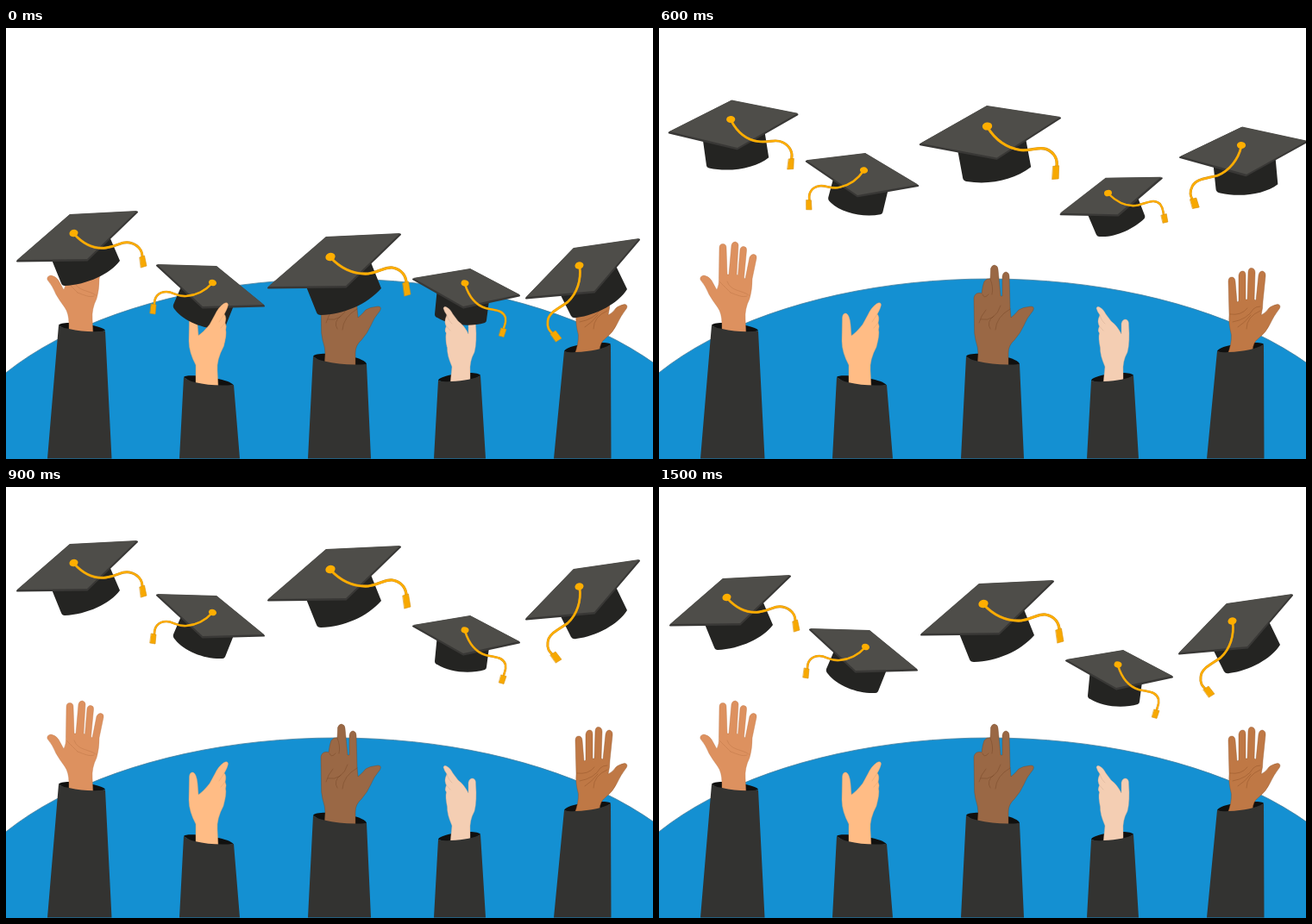
An HTML page with a canvas that plays this animation: 750 px wide and 500 px high, repeating every 1.8 s.

```html
<!DOCTYPE html>
<html lang="en">
<head>
<meta charset="utf-8">
<title>Cap toss</title>
<style>
html, body { margin: 0; width: 100%; height: 100%; overflow: hidden; background: #fff; }
canvas { display: block; width: 750px; height: 500px; }
</style>
</head>
<body>
<canvas id="stage" width="750" height="500"></canvas>
<script>
const ctx = document.getElementById('stage').getContext('2d');
const STEP = 300;

// Each step: caps held in hand, or lifted by some height, upright or tilted
const beats = [
  { held: true }, { lift: 0 }, { lift: 0, tilt: true },
  { lift: 40 }, { lift: 0, tilt: true }, { lift: 0 }
];

const arms = [
  {
    skin: '#dd915f', line: '#bd7446',
    back: 'M61 345C62 338 113 344 115 351L101 356L73 353Z',
    sleeve: 'M61 345Q66 348 73 349Q95 354 115 351.500L122.500 499.400H48Z',
    hand: 'M73 355L73 343Q73 331 68 324Q62 316 58 309Q54 299 48 292Q47 288 52 287Q58 288 61 293L67 304Q70 298 69.5 290L70 255Q70 250.5 74 250.5Q78 250.5 78 255L79 286L81 286L84 252Q85 248 88.5 248Q92 249 92 252L90 286L91.5 287L94 257Q95 253 98.5 253.5Q102 254 101.5 258L98.5 290L100 291L105 266Q107 262 110 262.5Q113.500 263 113 267L108 291Q108 304 105 314Q99 326 100 338L101 357Z',
    crease: 'M70 294C77 301 79 303 83 307M79 294C83 306 97 304 104 310M83 307C91 310 97 313 102 311'
  },
  {
    skin: '#ffbc85', line: '#dfa16e',
    back: 'M206 405C208 400 258 406 263.500 414L246 418L219 414Z',
    sleeve: 'M206 405Q211 409 219 411Q240 416 264 414L271 499.400H201Z',
    hand: 'M220 417V391Q212 376 212 363L212.500 336Q213 330.500 217 331Q221 333 222 344L223 357Q229 353 236 344L242 333Q246 324 252 320Q257 317 257.500 321Q257 325 253 332Q256 335 254 342Q256 346 254.500 350Q256 355 252 370Q244 385 245 397L246 418Z',
    crease: 'M253 332L247 341M254 342L249 348',
    front: [223, 40]
  },
  {
    skin: '#9a6845', line: '#744728',
    back: 'M356 381C358 374 415 379 418 390L405 394L369 390Z',
    sleeve: 'M356 381Q361 385 369 386.500Q392 392 418 390L423 499.400H350Z',
    hand: 'M369 392L370 378Q370 371 367 362Q365 354 365.500 345L365 313Q366 308 370 307.500Q373 307 374 308Q375 299 377 294Q380 290 384 291L384.500 279Q386 275 389 275Q393 276 393 280L396 311L398 311L398 288Q399 283 402.500 283Q406 284 406 288L407 325L408 336Q413 332 417 327Q421 324 431 323Q436 323 433.500 328Q426 337 423 345Q419 354 412 362Q405 368 405 377V394Z',
    crease: 'M384 291Q388 301 386 309M375 309Q377 315 382 309M373 338Q390 341 396 322M379 327Q373 334 371 342M390 350Q391 335 407 326M384 349Q379 341 388 334'
  },
  {
    skin: '#f4ceb3', line: '#cfab93',
    back: 'M501 409C501 402 547 396 550 403L538 411L515 413Z',
    sleeve: 'M501 409Q507 411 515 410Q540 409 550 403L556 499.400H496Z',
    hand: 'M515 413L517 393Q511 379 511.500 371Q509 359 510.500 354Q508 351 510.500 346Q508 341 509.500 337L511 333Q508 329 507 325Q508 322 511 324Q515 326 518 332L524 340Q531 345 536 355L536 343Q537 338 541 338Q545 339 544.500 345Q546 364 543 376Q537 387 538 399V412Z',
    crease: 'M511 333Q513 340 517 343M510.500 346L515 351',
    front: [495, 40]
  },
  {
    skin: '#bf7845', line: '#8f5126',
    back: 'M647 375C649 367 698 362 701 367L688 377L659 380Z',
    sleeve: 'M647 375Q653 377 660 376Q688 375 701 367L701.500 499.400H635Z',
    hand: 'M659 379Q664 366 663.500 356Q660 343 661 333L660 294Q660 289 664 289Q667.500 289 668 294L670 318L672 317L672 287Q673 282 676.500 282Q680 282 680 287V315H682L683 283Q683.500 278 687 278.500Q691 279 691 284L690 315L692 316L695 287Q696 282 699.500 282Q703.500 283 703 288L700 317Q700 325 698 333Q703 331 707 325Q710 322 717 320.500Q721 321 719.500 325Q712 335 708 344Q704 353 695 360Q688 365 688 375Z',
    crease: 'M662 332Q675 334 682 325M665 341Q682 338 689 326Q692 323 697 323M681 349Q681 335 697 328M671 347Q679 342 686 333'
  }
];

// Board corners run left, top, right, bottom; pin is the button; drop is the way down to the hand
const caps = [
  {
    board: [13, 159, 74, 106, 152, 102, 94, 158], pin: [78.5, 128], moved: [83.2, 106], turn: 14.2, size: 1, drop: 110,
    body: 'M53 159L64 186Q65 189 68 189C94 188 121 175 132 160L120 132Z',
    cord: 'M79 129C88 139 100 147 116 145C130 143 134 137 143 139C153 141 158 148 158 155',
    knot: 'M155 156L160.500 154L163 166L156.500 168Z'
  },
  {
    board: [175, 164, 244, 166, 299, 211, 228, 213], pin: [239.5, 185.5], moved: [237.5, 165], turn: -8.4, size: .9, drop: 110,
    body: 'M203 190L194 211Q193 214 196 217C207 231 231 240 251 239Q253 239 254 237L264 212Z',
    cord: 'M239 186C231 195 221 200 209 201C198 202 194 196 186 196C176 196 172 203 172 210',
    knot: 'M168.500 210L174 211L173 222L167 221Z'
  },
  {
    board: [304, 170, 371, 112, 457, 108, 394, 169], pin: [376, 135.5], moved: [380.5, 114], turn: 11.3, size: 1.12, drop: 130,
    body: 'M348 170L360 200Q361 203 365 203C392 202 418 191 435 172L423 142Z',
    cord: 'M376 136C388 149 402 156 420 155C434 153 438 147 448 148C459 150 464 158 464 166',
    knot: 'M460 166L466.500 164L469 179L462 181Z'
  },
  {
    board: [472, 200, 538, 189, 595, 219, 530, 233], pin: [532, 206], moved: [520.5, 191.5], turn: -28.5, size: .88, drop: 90,
    body: 'M500 211L497 242Q497 245 500 246C514 255 538 257 555 252Q557 251 557 249L560 226Z',
    cord: 'M532 207C536 220 543 231 556 235C568 238 576 237 579 246C580 252 578 255 577 258',
    knot: 'M574 258L580 259.500L577 268.500L571.500 267Z'
  },
  {
    board: [603, 192, 658, 135, 734, 124, 682, 185], pin: [664.5, 155.5], moved: [675, 136], turn: 20.5, size: 1, drop: 120,
    body: 'M643 190L655 214Q657 217 661 216C685 213 710 199 720 183L707 156Z',
    cord: 'M665 157C667 172 662 188 651 198C640 206 629 210 628 220C627 228 630 231 633 234',
    knot: 'M631 235L637 231L644 240L637.500 244Z'
  }
];

for (const item of [...arms, ...caps])
  for (const key in item)
    if (typeof item[key] === 'string' && item[key][0] === 'M') item[key] = new Path2D(item[key]);

function fill(path, color) {
  ctx.fillStyle = color;
  ctx.fill(path);
}

function stroke(path, color, width) {
  ctx.strokeStyle = color;
  ctx.lineWidth = width;
  ctx.stroke(path);
}

function polygon(p, drop = 0) {
  const path = new Path2D();
  for (let i = 0; i < p.length; i += 2) path.lineTo(p[i], p[i + 1] + drop);
  path.closePath();
  return path;
}

function drawHill() {
  const hill = new Path2D();
  hill.ellipse(383, 535, 460, 244, 0, 0, Math.PI * 2);
  fill(hill, '#1490d2');
  stroke(hill, '#4a7f9c', .8);
}

function drawHand(arm) {
  fill(arm.hand, arm.skin);
  stroke(arm.hand, arm.line, .4);
  stroke(arm.crease, arm.line, .45);
}

function drawArm(arm) {
  fill(arm.back, '#10100f');
  drawHand(arm);
  fill(arm.sleeve, '#333331');
}

// The finger that holds a cap's brim stays in front of it
function drawFinger(arm) {
  if (!arm.front) return;
  ctx.save();
  ctx.beginPath();
  ctx.rect(arm.front[0], 310, arm.front[1], 60);
  ctx.clip();
  drawHand(arm);
  ctx.restore();
}

function drawCap(cap, beat) {
  const [x, y] = cap.pin;
  const [px, py] = beat.tilt ? cap.moved : cap.pin;
  ctx.save();
  ctx.translate(px, py + (beat.held ? cap.drop : -beat.lift));
  if (beat.tilt) ctx.rotate(cap.turn * Math.PI / 180);
  ctx.translate(-x, -y);

  fill(cap.body, '#242422');
  const edge = polygon(cap.board, 1.5);
  fill(edge, '#393836');
  stroke(edge, '#393836', 2);
  fill(polygon(cap.board), '#4e4d49');

  stroke(cap.cord, '#c58a20', 2.9 * cap.size);
  stroke(cap.cord, '#ffae00', 2.3 * cap.size);
  fill(cap.knot, '#f7a800');
  stroke(cap.knot, '#d9920f', .6);
  const button = new Path2D();
  button.ellipse(x, y, 5.1 * cap.size, 4.1 * cap.size, cap.turn > 0 ? -.3 : .3, 0, Math.PI * 2);
  fill(button, '#ffae00');
  ctx.restore();
}

function draw(now) {
  const beat = beats[Math.floor(now / STEP) % beats.length];
  ctx.fillStyle = '#fff';
  ctx.fillRect(0, 0, 750, 500);
  drawHill();
  arms.forEach(drawArm);
  caps.forEach(cap => drawCap(cap, beat));
  if (beat.held) arms.forEach(drawFinger);
}

ctx.lineCap = ctx.lineJoin = 'round';
const start = performance.now();
function tick() {
  draw(performance.now() - start);
  requestAnimationFrame(tick);
}
tick();
</script>
</body>
</html>
```
